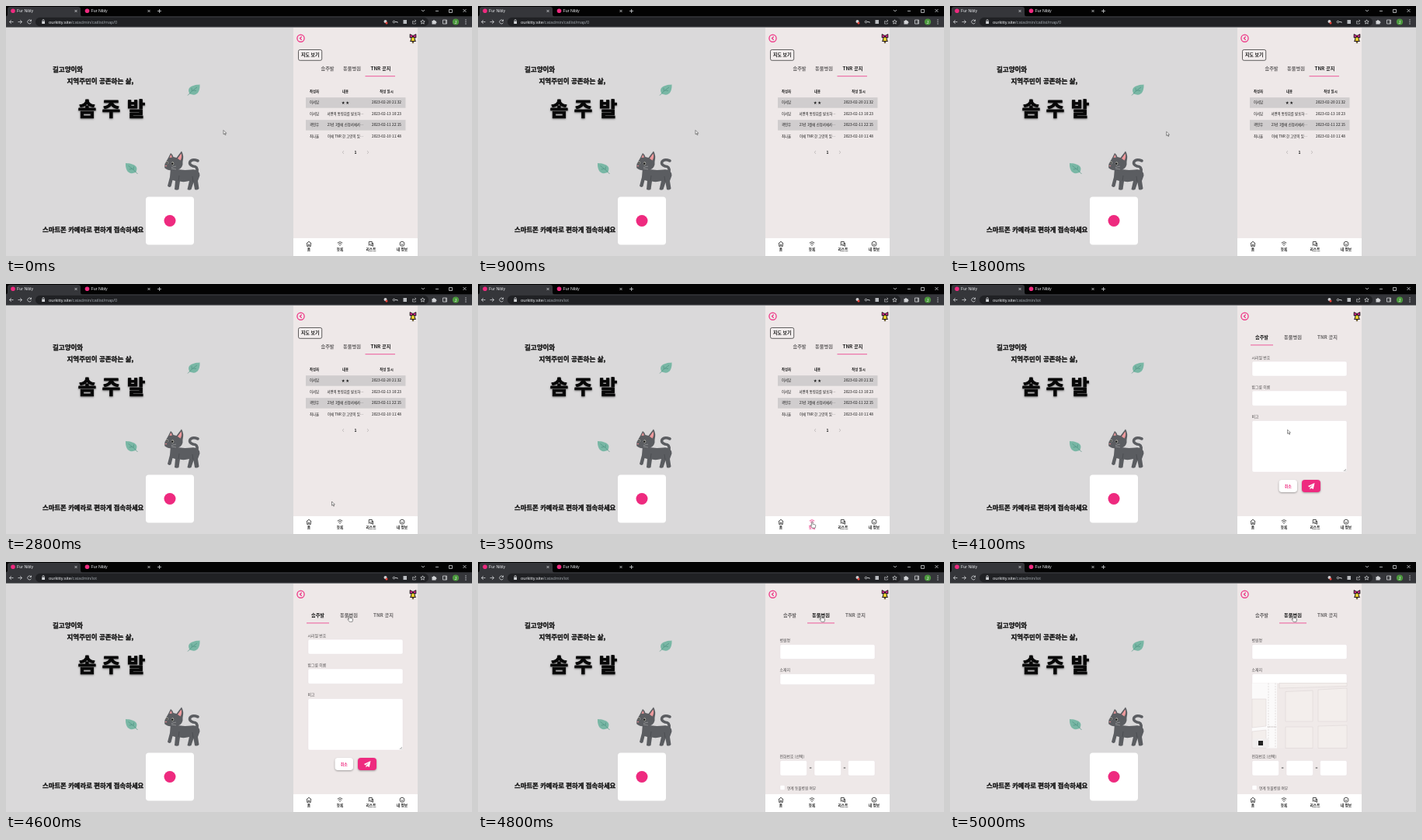
These frames come from a looping animation (600x323 px, 5100 ms). An HTML page:

```html
<!DOCTYPE html>
<html lang="ko">
<head>
<meta charset="utf-8">
<title>Fur Nibly</title>
<style>
  html, body { margin: 0; width: 100%; height: 100%; overflow: hidden; background: #dad9da; }
  svg { display: block; width: 100vw; height: 100vh; }
  text { font: 700 6.2px "Noto Sans CJK KR", "Noto Sans CJK", sans-serif; fill: #161616; }
  .chrome text { font: 5.8px "Liberation Sans", sans-serif; fill: #e8eaed; }
  .chrome .title { font-size: 5.3px; }
  .chrome .dim { fill: #9aa0a6; }
  .line { fill: none; stroke: #d0d2d5; stroke-width: .8; }
  .mid text, text.mid { text-anchor: middle; }
  .slogan { font-size: 8.5px; font-weight: 900; stroke: #161616; stroke-width: .35; }
  .brand text { font-size: 25.5px; font-weight: 900; fill: #080808; stroke: #080808; stroke-width: 1; stroke-linejoin: round; filter: drop-shadow(.5px 1.5px 1px #0006); }
  .tabs text { fill: #686566; }
  .tabs .on { fill: #1c1c1c; }
  .table text { font-size: 4.4px; font-weight: 500; }
  .table .date { font-size: 4.8px; }
  .form text { font-size: 4.9px; font-weight: 500; fill: #4c494a; }
  .field { fill: #fff; stroke: #e2dcdd; stroke-width: .4; }
  .nav text { font-size: 4.7px; font-weight: 900; }
  .nav path, .nav circle { fill: none; stroke: #222; stroke-width: .8; }
  .nav .hover text { fill: #ee2a7f; }
  .nav .hover path { stroke: #ee2a7f; }
  .pink { fill: none; stroke: #ee2a7f; stroke-width: 1.2; }
  .tab-line { fill: none; stroke: #ee4a92; stroke-width: .9; }
  .raised { filter: drop-shadow(0 1px 1px #0005); }
</style>
</head>
<body>
<svg viewBox="0 0 600 323" preserveAspectRatio="none">
  <rect width="600" height="323" fill="#dad9da"/>

  <g class="chrome">
    <rect width="600" height="14" fill="#030303"/>
    <path d="M0 13.3Q2 13 2 11V4Q2 1 5 1H93Q96 1 96 4V11Q96 13.3 98 13.3H600V27.5H0Z" fill="#35363a"/>
    <rect x="38" y="14.8" width="506" height="11.4" rx="5.7" fill="#202124"/>
    <g fill="#ee2a7f"><circle cx="9" cy="6.3" r="2.8"/><circle cx="104.5" cy="6.3" r="2.8"/></g>
    <text class="title" x="14" y="8.2">Fur Nibly</text>
    <text class="title" x="109.5" y="8.2">Fur Nibly</text>
    <path class="line" d="M88.5 5l3 3m0-3l-3 3M182.5 5l3 3m0-3l-3 3M195 6.5h5m-2.5-2.5v5
      M535 5l2 2 2-2M553 6.5h4M570.5 4.5h4v4h-4zM588.5 4l4 4m0-4l-4 4"/>
    <path class="line" d="M9.5 20.5H4.5m2.3-2.4L4.5 20.5l2.3 2.4M32.3 19a2.5 2.5 0 1 0 .2 2.5m0-4v2h-2"/>
    <path class="line" d="M15.5 20.5h5m-2.3-2.4l2.3 2.4-2.3 2.4"/>
    <path d="M46.2 19.6h3.8v3.4h-3.8z" fill="#d0d2d5"/>
    <path class="line" d="M47 19.6v-1a1.1 1.1 0 0 1 2.2 0v1"/>
    <text x="55" y="22.5">ourkitty.site<tspan class="dim" id="path"></tspan></text>
    <circle cx="488.5" cy="20" r="2" fill="#d0d2d5"/><circle cx="490" cy="22" r="1.5" fill="#e8453c"/>
    <circle class="line" cx="499.5" cy="20.5" r="1.3"/>
    <path class="line" d="M501 20.5h3v1.5"/>
    <rect x="511.5" y="18" width="4.5" height="5" fill="#b9bcc0"/>
    <path class="line" d="M525 19.5h-1.5v3.5h4v-1.5m-2.5 0q0-2.500 3-2.500m-1.5-1.3l1.5 1.3-1.5 1.3" opacity=".7"/>
    <path class="line" d="M536.5 17.8l.8 1.8 1.9.2-1.4 1.3.4 2-1.7-1.1-1.7 1.1.4-2-1.4-1.3 1.9-.2z"/>
    <path d="M548.500 19h1.5a1 1 0 0 1 2 0h1.500v1.200a1 1 0 0 1 0 2v1.300h-5z" fill="#d0d2d5"/>
    <path class="line" d="M562.5 18h5v5h-5zm3.7 0v5"/>
    <circle cx="579" cy="20.5" r="4.1" fill="#4c9a3e"/>
    <text class="mid" x="579" y="22.5">J</text>
    <g fill="#d0d2d5"><circle cx="592" cy="18" r=".7"/><circle cx="592" cy="20.5" r=".7"/><circle cx="592" cy="23" r=".7"/></g>
  </g>

  <text class="slogan" x="60" y="84.6">길고양이와</text>
  <text class="slogan" x="78.5" y="99.6">지역주민이 공존하는 삶,</text>
  <g class="brand mid"><text x="104.5" y="142.3">솜</text><text x="135.5" y="142.3">주</text><text x="167.500" y="142.3">발</text></g>
  <text class="slogan" x="47" y="291.8" style="font-size:8.4px">스마트폰 카메라로 편하게 접속하세요</text>

  <defs>
    <g id="leaf">
      <path d="M-5.500 5C-10-3-3-6.500 7.500-7C8 2 4 9-5.500 5Z" fill="#79b7a5"/>
      <path d="M-8 7Q-3 1 4-3.500M-2.500 1.500l-.5-4M-1 .500l4 .5" fill="none" stroke="#4e9381" stroke-width=".7"/>
    </g>
  </defs>
  <use href="#leaf" x="242" y="108.500"/>
  <use href="#leaf" transform="translate(161.500 210) scale(-1 1)"/>

  <g fill="#5b5d61">
    <path d="M246 214Q247 207 241 207Q235 205 237 201Q240 197 247 200" fill="none" stroke="#5b5d61" stroke-width="3.600" stroke-linecap="round"/>
    <path d="M212 209Q224 213 238 211.500Q249 210 249.500 219L247 226L248.500 236Q246 238.500 243 237L241.500 228L238.500 237Q236 238.500 233.500 237L236 226
      Q229 228 224 226.500L222.500 237Q220 238.500 217 237L218 226L214.500 225L212.500 233Q210 235 208 232.500L211 221Z"/>
    <path d="M204.500 204L209 196L212 190Q214.500 191.500 215.500 195L219.500 196L226 187.500Q229.500 193 227.500 201Q228.500 209 221 212Q209 214 204 209Z"/>
    <path d="M210.500 196l1.800-4 1.700 3.500zM221 197l4.600-6.500q1.500 5-1 9z" fill="#ef9a9d"/>
    <g fill="#e9e8d8"><ellipse cx="207.500" cy="202.500" rx="1.300" ry="1.700"/><ellipse cx="214.500" cy="203.500" rx="1.700" ry="1.900"/></g>
    <g fill="#17181a"><circle cx="207.400" cy="202.700" r="1.100"/><circle cx="214.300" cy="203.700" r="1.400"/></g>
    <path d="M204.500 206h3l-1.500 1.600z" fill="#ef8c97"/>
    <path d="M204.500 208l-4-2m4 3l-4 1M213 208.500l6-1.500m-6 3l6 1" stroke="#d5d5d5" stroke-width=".4"/>
    <path d="M223 219l-1 7M240 220l1 7" stroke="#46484c" stroke-width=".7"/>
  </g>

  <rect x="180" y="246.500" width="62" height="62" rx="4" fill="#fff"/>
  <circle cx="211" cy="277.500" r="7.500" fill="#ee2a7f"/>

  <rect x="370" y="28" width="160" height="295" fill="#eee8e8"/>
  <circle class="pink" cx="379.500" cy="41.700" r="4.600"/>
  <path class="pink" d="M380.700 39.500l-2.200 2.200 2.200 2.200"/>
  <g stroke="#1c1218">
    <path d="M524 38.500l-3.800-2v4.500l3.800-1.500 3.800 1.500v-4.500z" fill="#ee2a9f"/>
    <path d="M520.500 45.500q1.300-1 1.300-3.500.2-2 2.200-2t2.200 2q0 2.500 1.300 3.500z" fill="#f4d62f"/>
    <circle cx="524" cy="47" r=".9" fill="#f4d62f" stroke-width=".7"/>
  </g>

  <g id="notice">
    <rect x="376.500" y="56.500" width="30.200" height="13.800" rx="2" fill="#f3eeee" stroke="#222" stroke-width=".7"/>
    <text class="mid" x="391.700" y="65.300" style="font-size:5.900px">지도 보기</text>
    <g class="tabs mid"><text x="414" y="83">솜주발</text><text x="445.500" y="83">동물병원</text><text class="on" x="482.500" y="83">TNR 공지</text></g>
    <path class="tab-line" d="M462.500 90.700H501"/>
    <g class="table mid" id="rows"></g>
    <path class="line" d="M435 187l-1.800 2 1.800 2M465 187l1.800 2-1.800 2" style="stroke:#bbb6b7"/>
    <text class="mid" x="450" y="190.700" style="font-size:5px">1</text>
  </g>

  <g id="tabs" class="tabs mid">
    <text x="401.500" y="71">솜주발</text><text x="441.500" y="71">동물병원</text><text x="486" y="71">TNR 공지</text>
    <path class="tab-line" id="underline"/>
  </g>

  <g id="bowl" class="form">
    <text x="388.500" y="97">시리얼 번호</text><rect class="field" x="389" y="100" width="122" height="19" rx="2"/>
    <text x="388.500" y="135">밥그릇 이름</text><rect class="field" x="389" y="138" width="122" height="19.500" rx="2"/>
    <text x="388.500" y="173">비고</text><rect class="field" x="389" y="176.500" width="122" height="66.500" rx="2"/>
    <path d="M507 242l3-3m-1.200 3l1.200-1.200" stroke="#555" stroke-width=".5"/>
    <g class="raised"><rect x="423.500" y="253" width="23.500" height="16" rx="4" fill="#fff"/><rect x="453" y="253" width="24" height="16" rx="4" fill="#ee2a7f"/></g>
    <text class="mid" x="435.300" y="262.700" style="fill:#ee2a7f;font-weight:700">취소</text>
    <path d="M461 261l8.500-4-1.700 8-2.800-1.300-1.500 1.800v-2.600l4-4-5 3.500z" fill="#fff"/>
  </g>

  <g id="clinic" class="form">
    <text x="388.500" y="103">병원명</text><rect class="field" x="389" y="106.500" width="122" height="19" rx="2"/>
    <text x="388.500" y="141">소재지</text><rect class="field" x="389" y="144.500" width="122" height="14" rx="2"/>
    <g id="map">
      <rect x="389" y="156.500" width="122" height="84" fill="#f0eae9"/>
      <path d="M389 156.500H421V240.500H389z" fill="#fbfafa"/>
      <g fill="#f3eeec" stroke="#d8d1d0" stroke-width=".5">
        <path d="M389 177H407V212L389 214zM389 219L407 217V240.500H389zM424 156.500H511V160.500L424 163z"/>
        <path d="M432 167.500L467 166V206H432zM474 165L511 163V206H474zM432 213H467V240.500H432zM474 212L511 211V240.500H474z"/>
      </g>
      <path d="M410 156.500V240M419 156.500V240" stroke="#c9c3c2" stroke-width=".5" stroke-dasharray="2 1.500"/>
      <path d="M409 213h12" stroke="#d5d0cf" stroke-width="2" stroke-dasharray="1 1"/>
      <rect x="389.500" y="228" width="21" height="12" rx="2" fill="#f1eeee"/>
      <rect x="397" y="231" width="6" height="6" fill="#222"/>
    </g>
    <text x="388.500" y="253">전화번호 (선택)</text>
    <rect class="field" x="389" y="256.500" width="34.500" height="19.500" rx="2"/>
    <rect class="field" x="433" y="256.500" width="34.500" height="19.500" rx="2"/>
    <rect class="field" x="476.500" y="256.500" width="34.500" height="19.500" rx="2"/>
    <path d="M426.900 266h2.500M470.700 266h2.500" stroke="#333" stroke-width=".9"/>
    <rect class="field" x="389" y="288.500" width="6" height="6" rx="1"/>
    <text x="398" y="293.700" style="font-size:4.700px">연계 동물병원 여부</text>
  </g>

  <rect x="370" y="300" width="160" height="23" fill="#fff"/>
  <g class="nav mid">
    <path d="M386.800 307l3.200-2.800 3.200 2.800M387.700 306.500v4h1.500v-2h1.600v2h1.500v-4"/><text x="390" y="316.300">홈</text>
    <g id="register"><path d="M426.800 306q3.200-2.600 6.400 0M428 307.700q2-1.600 4 0M429.300 309.500h1.400"/><text x="430" y="316.300">등록</text></g>
    <path d="M467.300 304.500h4v3.500h-2.500l-1.500 1.300zM472.500 306v4.500l-1.300-1h-2"/><text x="470" y="316.300">리스트</text>
    <circle cx="510" cy="307.300" r="3"/><path d="M508.500 307.500q1.500 2 3 0"/><text x="510" y="316.300">내 정보</text>
  </g>

  <g id="cursor" fill="#fff" stroke="#222" stroke-width=".5">
    <path id="arrow" d="M0 0V5.200L1.300 4.100 2.200 6.200 3.100 5.800 2.200 3.800H3.800Z"/>
    <path id="hand" d="M0 .7Q.7-.5 1.400.7V3.200L4.500 4Q5.400 4.300 5 6L4.400 8.200H.8L-1.600 5.200Q-1.500 4.200-.6 4.700L0 5.300Z"/>
  </g>
</svg>
<script>
const $ = id => document.getElementById(id);
const LOOP = 5100, STEP = 100;

const columns = [['name', 397], ['content', 437], ['date', 490]];
const rows = [
  ['작성자', '내용', '작성 일시'],
  ['이서담', '★ ★', '2023-02-20 21:32'],
  ['이서담', '서면역 통영회를 발포하…', '2023-02-13 10:23'],
  ['곽민우', '23년 1월에 신청서에서…', '2023-02-11 22:15'],
  ['최나율', '이에 TNR 한 고양이 있…', '2023-02-10 11:48'],
];
$('rows').innerHTML = rows.map((cells, i) => {
  const y = 111.7 + i * 14.5;
  const band = i % 2 ? `<rect x="386" y="${y - 8}" width="128.5" height="13.5" fill="#d0cdce"/>` : '';
  const cellText = (cell, c) => {
    const [kind, x] = columns[c];
    return i ? `<text class="${kind}" x="${x}" y="${y}">${cell}</text>`
             : `<text x="${x}" y="${y}" style="font-weight:700">${cell}</text>`;
  };
  return band + cells.map(cellText).join('');
}).join('');

// Pointer path: time, x, y
const track = [
  [0, 280, 160.5], [1300, 280, 160.5], [1600, 279.2, 161.5], [1800, 278.7, 162.3], [2100, 278.7, 162.3],
  [2700, 417.5, 263], [2800, 419.5, 281], [3200, 429.7, 307], [3800, 429.7, 307],
  [4400, 439.5, 69.5], [4600, 441.5, 69], [LOOP, 441.5, 69],
];

function pointerAt(t) {
  const i = track.findIndex(key => key[0] > t);
  const [t0, x0, y0] = track[i - 1], [t1, x1, y1] = track[i];
  const k = (t - t0) / (t1 - t0), e = k * k * (3 - 2 * k);
  return [x0 + (x1 - x0) * e, y0 + (y1 - y0) * e];
}

const show = (id, on) => $(id).style.display = on ? '' : 'none';

function draw(now) {
  const t = Math.floor(now % LOOP / STEP) * STEP;
  const overNav = t >= 3200 && t < 3900, hand = overNav || t >= 4400;
  const form = t >= 3600, clinic = t >= 4800;
  $('path').textContent = t < 3500 ? '/catadmin/catlist/map/0' : '/catadmin/iot';
  show('notice', !form);
  show('tabs', form);
  show('bowl', form && !clinic);
  show('clinic', clinic);
  show('map', t >= 4900);
  [...$('tabs').querySelectorAll('text')].forEach((tab, i) => tab.classList.toggle('on', i === +clinic));
  $('underline').setAttribute('d', clinic ? 'M424 78.9H459' : 'M387 78.9H416');
  $('register').classList.toggle('hover', overNav);
  show('hand', hand);
  show('arrow', !hand);
  $('cursor').setAttribute('transform', `translate(${pointerAt(t)})`);
}

const start = performance.now();
(function tick() {
  draw(performance.now() - start);
  requestAnimationFrame(tick);
})();
</script>
</body>
</html>
```
